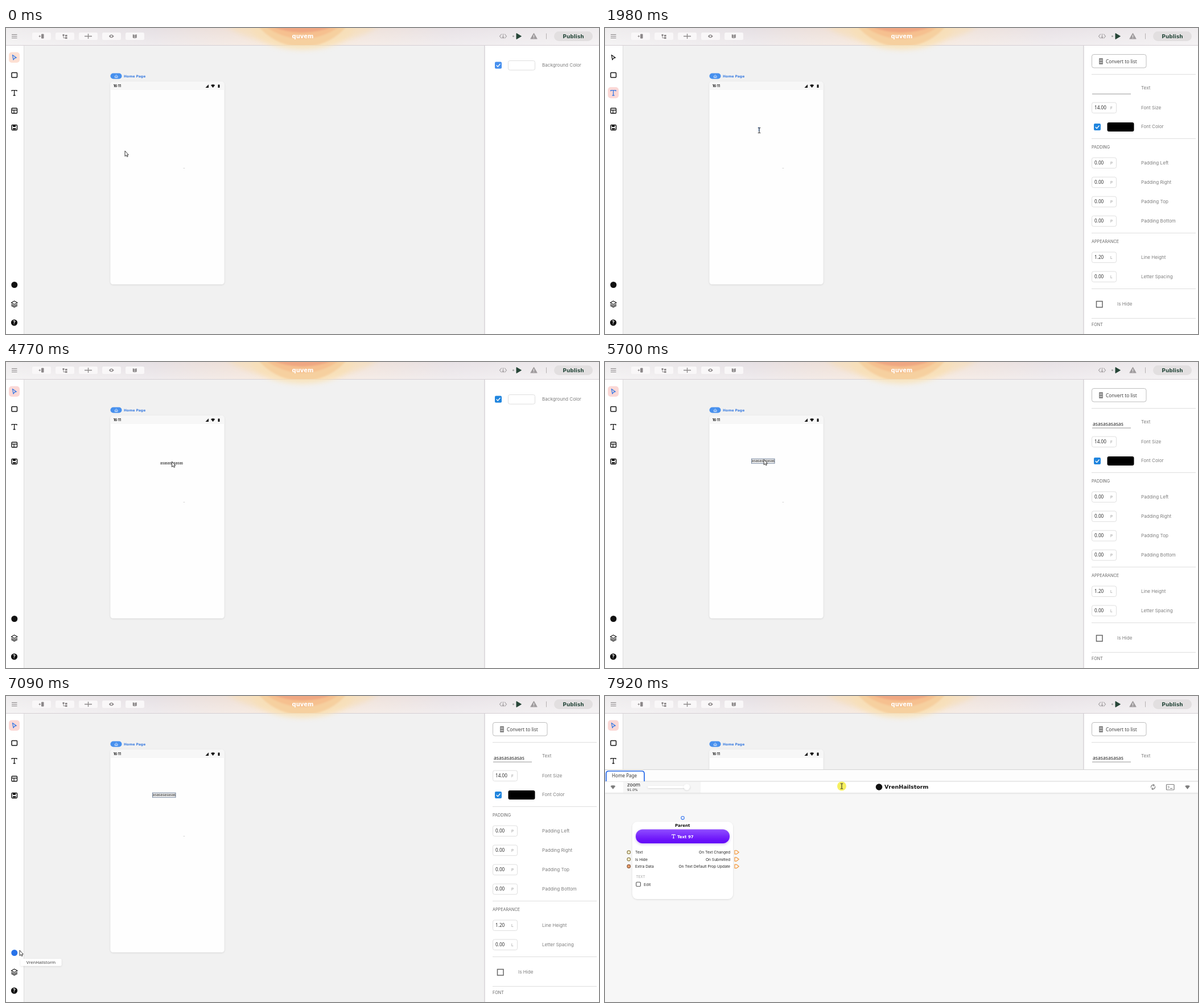
Animation, 1042 px wide and 538 px high, one loop 7990 ms. Source, as an HTML page:

```html
<!DOCTYPE html>
<html lang="en">
<head>
<meta charset="utf-8">
<title>App builder</title>
<style>
html, body { margin: 0; width: 100%; height: 100%; overflow: hidden; background: #f1f1f1; }
svg { display: block; width: 1042px; height: 538px; }
text { white-space: pre; }
.ui { font-family: Inter, sans-serif; }
.wide { font-family: "DejaVu Sans", sans-serif; font-weight: 700; }
.zoom { font-family: "DejaVu Sans", sans-serif; }
.note { font-family: "Noto Sans", sans-serif; }
.app { font-family: Roboto, sans-serif; }
</style>
</head>
<body>
<svg id="stage" viewBox="0 0 1042 538"></svg>
<script>
const LOOP = 7990;
const BRAND = 'quvem', TOOL = 'VrenHailstorm';
const stage = document.getElementById('stage');

// Markup helpers; text is placed by its vertical centre.
const text = (x, y, s, size, fill, cls = 'ui', extra = '') =>
  `<text x="${x}" y="${(y + size * 0.36).toFixed(2)}" font-size="${size}" fill="${fill}" class="${cls}" ${extra}>${s}</text>`;
const rect = (x, y, w, h, fill, extra = '') =>
  `<rect x="${x}" y="${y}" width="${w}" height="${h}" fill="${fill}" ${extra}/>`;
const path = (d, stroke, width = 1, fill = 'none', extra = '') =>
  `<path d="${d}" stroke="${stroke}" stroke-width="${width}" fill="${fill}" ${extra}/>`;
const circle = (x, y, r, fill, extra = '') =>
  `<circle cx="${x}" cy="${y}" r="${r}" fill="${fill}" ${extra}/>`;
const group = (id, body, extra = '') => `<g id="${id}" ${extra}>${body}</g>`;
const END = 'text-anchor="end"', MID = 'text-anchor="middle"';

const defs = `<defs>
  <linearGradient id="bar">
    <stop offset="0" stop-color="#efedee"/><stop offset=".25" stop-color="#e6e0e4"/>
    <stop offset=".4" stop-color="#f0e0d6"/><stop offset=".5" stop-color="#f7e0c4"/>
    <stop offset=".6" stop-color="#f0e2da"/><stop offset=".75" stop-color="#e8e2e6"/>
    <stop offset="1" stop-color="#efecee"/>
  </linearGradient>
  <linearGradient id="fade" x2="0" y2="1">
    <stop offset="0" stop-color="#fff" stop-opacity="0"/><stop offset="1" stop-color="#fff" stop-opacity=".35"/>
  </linearGradient>
  <linearGradient id="violet" x2="0" y2="1">
    <stop offset="0" stop-color="#8f4dff"/><stop offset="1" stop-color="#6000f8"/>
  </linearGradient>
  <filter id="soft" x="-20%" y="-50%" width="140%" height="200%"><feGaussianBlur stdDeviation="5"/></filter>
  <filter id="haze"><feGaussianBlur stdDeviation="1.6"/></filter>
  <filter id="drop" x="-20%" y="-20%" width="140%" height="150%">
    <feDropShadow dx="0" dy="1" stdDeviation="1.8" flood-opacity=".12"/>
  </filter>
  <filter id="glow" x="-10%" y="-30%" width="120%" height="180%">
    <feDropShadow dx="0" dy="1.5" stdDeviation="2" flood-color="#6a30d0" flood-opacity=".35"/>
  </filter>
  <clipPath id="menuClip"><rect x="292" y="176" width="273" height="306"/></clipPath>
  <clipPath id="barClip"><rect width="1042" height="30"/></clipPath>
</defs>`;

function header() {
  const g = '#8c8889';
  let s = rect(0, 0, 1042, 30, 'url(#bar)') + rect(0, 0, 1042, 30, 'url(#fade)')
    + path('M0 30.5H1042', '#d5cfd4')
    + `<ellipse cx="521" cy="-8" rx="92" ry="46" fill="#fbe0ae" opacity=".75" filter="url(#soft)"/>`
    + `<g clip-path="url(#barClip)">`
    + `<ellipse cx="521" cy="-18" rx="138" ry="46" fill="#f7dfba" opacity=".7" filter="url(#soft)"/>`
    + `<g filter="url(#haze)">` + circle(521, -69, 102, '#f7cf9d', 'opacity=".9"')
    + circle(521, -88, 107, '#f6c08f')
    + circle(521, -134, 142, '#f0a782') + `</g></g>`
    + path('M10 11.5H19.5M10 14.5H19.5M10 17.5H19.5', '#858183');
  for (let i = 0; i < 5; i++) s += rect(46 + 41 * i, 8, 33, 13, '#f9f7f8', 'rx="2.5"');
  s += rect(62, 10.5, 4.5, 8, g, 'rx="1"') + path('M57.5 14.5H61M59.3 12.7V16.3', g)
    + rect(99.5, 11, 3, 3, g) + rect(104, 12, 3.5, 3, g) + rect(104, 16, 3.5, 3, g) + path('M101 13.5V17.5H104', g, .9)
    + path('M138 14.5H151M144.5 10V19', g, 1.3)
    + path('M181 14.5Q185 9.2 189.5 14.5Q185 19.5 181 14.5Z', g, .5, g) + circle(185.2, 14.4, 1.4, '#fff')
    + path('M223 11.5L226 12.3L229.5 11.5V17L226 18L223 17Z', g, .5, g) + path('M226.2 12V18', '#fff', .7)
    + text(521.5, 14.5, BRAND, 10, '#fff', 'wide', MID)
    + path('M871 10.5L867.5 14.5L871 18.5M876 10.5L879.5 14.5L876 18.5M873.5 10V18M871.6 15.5L873.5 18L875.4 15.5', '#a29ea0', 1.1)
    + circle(891.5, 14.5, 1.6, '#a9a9a9') + path('M897 9.5L905.5 14.5L897 19.5Z', '#274638', 1, '#274638')
    + path('M927.5 9.5L933 19H922Z', '#a09c9e', 1.2, '#a09c9e', 'stroke-linejoin="round"') + path('M927.5 12.5V16M927.5 17V18', '#fff', 1)
    + path('M949.5 9.5V19.5', '#b5b0b2') + rect(963, 6, 68, 17, '#e2dfe0', 'rx="8.5"')
    + text(997, 14.5, 'Publish', 9, '#294a3d', 'wide', MID);
  return s;
}

function sidebar() {
  const k = '#161616';
  return rect(0, 31, 31, 507, '#fff') + path('M31.5 31V538', '#dcdcdc')
    + `<rect id="mark" x="5" width="19" rx="5"/>`
    + path('M11.5 47.5L18.3 52.2L15 53L13 56Z', k, 1.3, 'none', 'id="pick" stroke-linejoin="round"')
    + rect(10, 78.5, 9.5, 8.5, 'none', `stroke="${k}" stroke-width="1.5" rx="1.2"`)
    + path('M10.2 111.3V109.6H19V111.3M14.6 109.6V118.5M12.6 118.5H16.6', k, 1.3, 'none', 'id="tee"')
    + rect(10, 141, 9.5, 9, 'none', `stroke="${k}" stroke-width="1.4" rx="1.2"`) + path('M10 144.3H19.5M14 144.3V150', k, 1.3)
    + rect(10, 170.5, 9.5, 9, 'none', `stroke="${k}" stroke-width="1.5" rx="1.4"`) + rect(12, 171, 5, 3, k) + rect(12, 176, 5.5, 2.5, k)
    + circle(14.8, 451.5, 5.5, '#111', 'id="bolt"')
    + path('M9.3 483L14.6 480L20 483L14.6 486ZM9.3 485.7L14.6 488.7L20 485.7M9.3 488L14.6 491L20 488', k, 1.2, 'none', 'stroke-linejoin="round"')
    + circle(14.5, 518, 5.6, '#0a0a0a') + text(14.5, 518, '?', 8.5, '#fff', 'ui', MID + ' font-weight="700"');
}

function phone() {
  return rect(183.5, 94.5, 200, 356, '#fefefe', 'rx="4.5" filter="url(#drop)"')
    + path('M183.5 109V99Q183.5 94.5 188 94.5H379Q383.5 94.5 383.5 99V109Z', 'none', 0, '#f7f7f7')
    + rect(183.5, 79.5, 20, 10, '#4790ee', 'rx="5"')
    + path('M191.3 84.8L193.7 82.6L196.1 84.8V87H191.3ZM193.7 85V87', '#fff', .8)
    + text(207, 84.8, 'Home Page', 6, '#3f7fe0', 'wide')
    + text(188.7, 101.8, '16:11', 5.8, '#151515', 'ui', 'font-weight="700"')
    + path('M350.5 105H356V99.3Z', 'none', 0, '#111') + path('M360 100.5Q363.6 97.8 367.2 100.5L363.6 105Z', 'none', 0, '#111')
    + rect(372.5, 99.5, 3, 5.5, '#111', 'rx=".6"') + rect(312, 246, 1.6, .8, '#aaa');
}

const tick = (y) => rect(859, y - 6, 12, 12, '#2085de', 'rx="2" class="tick"')
  + path(`M861.8 ${y}L864.2 ${y + 2.5}L868.5 ${y - 2.5}`, '#fff', 1.3);
const label = (y, s, x = 942) => text(x, y, s, 8.1, '#7f7f7f');
const heading = (y, s) => text(855, y, s, 7.2, '#666');
const field = (y, value, unit, name) =>
  rect(855.5, y - 9, 43, 18.5, '#fff', 'rx="3" stroke="#dfdfdf"')
  + text(860, y, value, 8.2, '#333', 'note') + text(888, y + .5, unit, 6.5, '#909090') + label(y, name);

function inspector() {
  const plain = tick(65.5) + rect(882.5, 57.5, 47, 16.5, '#fff', 'rx="3" stroke="#dedede"') + label(65.5, 'Background Color');
  const rules = [81.5, 194.5, 360.5, 458.5, 510.5].map(y => path(`M855 ${y}H1038`, '#dedede')).join('');
  const sides = ['Left', 'Right', 'Top', 'Bottom'].map((s, i) => field(237 + 34.1 * i, '0.00', 'P', 'Padding ' + s)).join('');
  const props = rules
    + rect(855.5, 46.5, 95.5, 23.5, '#fff', 'rx="3.5" stroke="#bdbdbd"')
    + rect(868, 53, 7, 11, '#8b8b8b', 'rx="1"') + path('M869 56.5H874M869 60.5H874', '#ddd')
    + text(880, 58.5, 'Convert to list', 8.4, '#444', 'note')
    + path('M856 116H924', '#979797') + label(105, 'Text') + text(857, 109, '', 8.65, '#222', 'note', 'id="value"')
    + field(140, '14.00', 'F', 'Font Size')
    + tick(174) + rect(882.5, 166, 47, 16, '#000', 'rx="3"') + label(173.5, 'Font Color')
    + heading(209.5, 'PADDING') + sides
    + heading(375.5, 'APPEARANCE') + field(403, '1.20', 'L', 'Line Height') + field(437, '0.00', 'L', 'Letter Spacing')
    + rect(863.5, 480.5, 10.5, 10.5, '#fff', 'stroke="#666" stroke-width="1.5"') + label(485.5, 'Is Hide', 900)
    + heading(521, 'FONT');
  return rect(841, 31, 201, 507, '#fff') + path('M841 31V538', '#d5d0d5', 1.4)
    + group('plain', plain) + group('props', props);
}

function menu() {
  const dim = '#565656', hot = '#f3b09e', head = '#8d8d8d';
  const line = (y, c = '#303030') => path(`M292 ${y}H565`, c);
  const rows = [['Group', 'g', 1], ['ScrollView', 'h', 1], ['List', 'l', 1], ['PageList', 'p', 1], ['Column', ',', 0], ['Row', '.', 0]];
  const body = rows.map(([name, key, on], i) => {
    const y = 294.5 + 27.25 * i;
    return text(299, y, name, 8.7, on ? hot : dim, 'ui', on ? 'font-weight="500"' : '')
      + text(421, y, 'ctrl+' + key, 7.1, on ? '#999' : dim, 'ui', END)
      + path(`M428.5 ${y - 8}V${y + 9}`, '#5d3a33')
      + text(435, y, 'Un-' + name, 8.6, dim) + text(558, y, 'ctrl+shift+' + key, 7.1, dim, 'ui', END)
      + line((y + 12.5).toFixed(1));
  }).join('');
  return rect(292, 176, 273, 324, '#000', 'rx="8" filter="url(#drop)"')
    + text(299, 193, 'EDIT', 6.5, head)
    + text(299, 215, 'Back to Selection Cursor', 8.7, dim) + text(558, 215, 'v', 7.1, dim, 'ui', END) + line(227.5)
    + text(299, 242.5, 'Edit in ' + TOOL, 8.7, '#ddd', 'ui', 'id="edit"') + text(558, 242.5, 'ctrl+q', 7.1, '#999', 'ui', END)
    + path('M292 254.5H565', '#303030', 1, 'none', 'id="editLine"')
    + text(299, 272, 'CONVERT TO', 6.45, head) + body
    + text(299, 460.5, 'ESSENTIALS', 6.5, head)
    + `<g clip-path="url(#menuClip)">` + text(299, 482.5, 'Delete', 8.7, hot, 'ui', 'font-weight="500"')
    + text(558, 482.5, 'del', 7.1, '#999', 'ui', END) + `</g>`
    + text(428, 489.5, 'ARSENAL', 6.5, '#777', 'ui', MID);
}

function drawer() {
  const g = '#7c7c7c', k = '#252525';
  const ins = ['Text', 'Is Hide', 'Extra Data'], outs = ['On Text Changed', 'On Submitted', 'On Text Default Prop Update'];
  const ports = ins.map((s, i) => {
    const y = 274.7 + 12.4 * i;
    return circle(41.8, y, 2.8, i < 2 ? '#fdf4cf' : '#f0a06c', `stroke="${i < 2 ? '#8c7d4c' : '#8a5a3c'}" stroke-width="1.2"`)
      + text(53, y, s, 6.7, k) + text(220, y, outs[i], 6.7, k, 'ui', END)
      + path(`M228 ${y - 3.2}H231L235.3 ${y}L231 ${y + 3.2}H228Z`, '#f0983f', 1.2, '#fff7ee', 'stroke-linejoin="round"');
  }).join('');
  const arrow = x => path(`M${x - 4} 158.5L${x - 2} 157.5H${x + 2}L${x + 4} 158.5L${x} 163.5Z`, g, .6, g);
  return rect(0, 129, 1042, 409, '#f7f7f7') + rect(0, 150, 1042, 20, '#fff', 'filter="url(#drop)"')
    + rect(0, 129, 1042, 21, '#fdfdfd') + path('M0 129.5H1042M0 150H1042', '#d4d4d4')
    + path('M2 150V136.5Q2 132 6.5 132H64.5Q69 132 69 136.5V150', '#2468e8', 1.7, '#fff')
    + text(12, 140.5, 'Home Page', 8.1, '#383838', 'note')
    + rect(32, 151, 136, 19, '#f6f6f6') + text(39, 156, 'zoom', 8.5, '#222', 'zoom') + text(39, 164.5, '91.0%', 5.8, '#333', 'zoom')
    + rect(75, 158, 74, 4, '#fff', 'rx="2" filter="url(#drop)"') + circle(143.8, 160, 5.3, '#fff', 'filter="url(#drop)"')
    + arrow(14) + arrow(1023.5)
    + circle(481.5, 160, 5.8, '#111') + text(491, 160, TOOL, 9.5, '#111', 'wide')
    + path('M959.7 161.5A3.6 3.6 0 0 1 964.5 156.8M966.3 158.5A3.6 3.6 0 0 1 961.5 163.2M963.5 155L965.3 157L963.2 158.5M962.5 165L960.8 163L963 161.5', g, 1.1)
    + rect(986.5, 155.5, 13.5, 9.5, 'none', `stroke="${g}" stroke-width="1.2" rx="1"`) + path('M989 158L991.5 160.2L989 162.5M993 162.5H997', g)
    + rect(48, 221, 177, 136, '#fff', 'rx="9" filter="url(#drop)"')
    + circle(136.5, 214.3, 2.7, '#fff', 'stroke="#4c84ee" stroke-width="1.3"')
    + text(136.2, 227, 'Parent', 7, '#111', 'wide', MID)
    + rect(54, 234.5, 165, 24.5, 'url(#violet)', 'rx="12" filter="url(#glow)"')
    + path('M117.5 245V243.7H123.3V245M120.4 243.7V249.8M119 249.8H121.8', '#fff') + text(127, 247, 'Text 97', 7, '#fff', 'wide')
    + ports + text(54.5, 318, 'TEXT', 6.3, '#a3a3a3')
    + rect(54.8, 327.2, 7.6, 7.6, '#fff', 'stroke="#555" stroke-width="1.1" rx="1.5"') + text(68, 331, 'Edit', 7, '#333', 'note');
}

const tooltip = rect(25.5, 462, 72, 12.5, '#fff', 'rx="2" filter="url(#drop)"') + text(61.5, 468.5, TOOL, 7.6, '#444', 'note', MID);

const cursors = circle(0, 0, 8, '#f4ec38', 'id="press" opacity=".8"')
  + group('arrow', path('M0 0V9.5L2.2 7.6L3.7 10.5L5.2 9.7L3.8 7H6.3Z', '#222', .9, '#fff'))
  + group('beam', path('M-2.2 -4.5H-.6L0 -4L.6 -4.5H2.2M0 -4V4M-2.2 4.5H-.6L0 4L.6 4.5H2.2', '#222', 1))
  + group('hand', path('M-1.5 -6Q0 -7 .8 -5.5V-2L4.6 -1Q5.6 -.6 5.2 1.2L4.3 5.8H-1.3L-4.2 1.6Q-4 0 -2.3 1L-1.5 1.8Z', '#111', .8, '#fff'));

stage.innerHTML = defs + rect(0, 0, 1042, 538, '#f1f1f1') + phone()
  + group('word', rect(-.5, -4, 40.5, 8, 'none', 'id="frame" stroke="#61748f" stroke-width=".9"')
    + text(0, 0, '', 6.3, '#1c1c1c', 'app', 'id="typed"') + rect(0, -4, 1, 7.5, '#2f80ed', 'id="caret"'))
  + inspector() + sidebar() + group('menu', menu()) + group('tip', tooltip) + group('drawer', drawer())
  + header() + group('cursor', cursors);

const el = {};
stage.querySelectorAll('[id]').forEach(n => el[n.id] = n);
const ticks = stage.querySelectorAll('.tick');
const show = (n, on) => n.setAttribute('display', on ? 'inline' : 'none');
const set = (n, name, v) => n.setAttribute(name, v);

// Pointer route: time, x, y
const route = [
  [0, 209, 216], [690, 18, 116], [850, 18, 116], [1380, 271, 180], [2320, 271, 180],
  [3080, 329, 206], [3340, 339, 217], [3740, 461, 203], [4300, 461, 203], [4770, 291.5, 175],
  [5200, 291.5, 175], [5500, 278.5, 171], [5680, 278.5, 171], [5840, 292, 176], [5880, 292, 176],
  [6120, 315, 244], [6350, 315, 244], [7090, 24, 447], [7260, 24, 447], [7620, 408, 330], [7920, 416, 158.5]
];
const presses = [[690, 830], [1380, 1450], [3740, 3880], [4900, 4970], [5240, 5700], [7230, 7300], [7620, LOOP]];
const GRAB = 7620, SELECT = 4970, COMMIT = 3810;

// Monotone cubic through the route: no stop at passing points, no overshoot at rests.
const slope = (i, n) => (route[i + 1][n] - route[i][n]) / (route[i + 1][0] - route[i][0]);
function tangent(i, n) {
  if (i === 0 || i === route.length - 1) return 0;
  const a = slope(i - 1, n), b = slope(i, n);
  return a * b <= 0 ? 0 : 2 * a * b / (a + b);
}
function pointer(t) {
  const j = route.findIndex(k => k[0] > t);
  if (j < 0) return route[route.length - 1].slice(1);
  const i = j - 1, span = route[j][0] - route[i][0], p = (t - route[i][0]) / span, q = 1 - p;
  return [1, 2].map(n =>
    route[i][n] * q * q * (1 + 2 * p) + route[j][n] * p * p * (3 - 2 * p)
    + span * p * q * (tangent(i, n) * q - tangent(j, n) * p));
}

function typedCount(t) {
  if (t < 2120) return 0;
  if (t < 2320) return 1;
  return Math.min(12, 2 + Math.floor((t - 2320) / 127));
}

function draw(t) {
  const [x, y] = pointer(t);
  const textTool = t >= 760 && t < 4350;
  const props = (t >= 1980 && t < COMMIT) || t >= SELECT;
  const open = t >= 5850 && t < 6460;
  const panel = t >= 7300;
  const editing = t >= 1650 && t < COMMIT;

  set(el.mark, 'y', textTool ? 104 : 42.5);
  set(el.mark, 'height', textTool ? 19.5 : 18.5);
  set(el.mark, 'fill', t < 760 ? '#fde0d3' : '#fbd8d6');
  set(el.pick, 'stroke', textTool ? '#161616' : '#3478e5');
  set(el.tee, 'stroke', textTool ? '#3478e5' : '#161616');
  ticks.forEach(n => set(n, 'fill', t < 1980 ? '#468fee' : '#2085de'));

  show(el.plain, !props);
  show(el.props, props);
  el.value.textContent = t >= SELECT ? 'as'.repeat(6) : '';

  // The word follows the pointer while it is dragged.
  const [dx, dy] = t < 5200 ? [0, 0] : t < 5500 ? [x - 291.5, y - 175] : [-13, -4];
  const n = typedCount(t);
  el.typed.textContent = 'as'.repeat(6).slice(0, n);
  set(el.word, 'transform', `translate(${(editing ? 270 : 271) + dx} ${178.2 + dy})`);
  show(el.frame, t >= SELECT);
  show(el.caret, editing);
  set(el.caret, 'x', n ? el.typed.getComputedTextLength() + .3 : 0);

  show(el.menu, open);
  const hot = y > 228;
  set(el.edit, 'fill', hot ? '#3f86f5' : '#ddd');
  set(el.editLine, 'stroke', hot ? '#24488a' : '#303030');

  const hover = t >= 7000 && !panel;
  set(el.bolt, 'fill', hover ? '#2873ea' : '#111');
  show(el.tip, hover);

  // The drawer opens low and is pulled up by its title bar.
  show(el.drawer, panel);
  set(el.drawer, 'transform', `translate(0 ${(t < GRAB ? 330 : y) - 158.5})`);

  const beam = (textTool && x > 32) || t >= GRAB;
  const hand = open && hot;
  set(el.cursor, 'transform', `translate(${x.toFixed(2)} ${y.toFixed(2)})`);
  show(el.press, presses.some(([a, b]) => t >= a && t < b));
  show(el.beam, beam);
  show(el.hand, hand);
  show(el.arrow, !beam && !hand);
}

const start = performance.now();
function loop() {
  draw((performance.now() - start) % LOOP);
  requestAnimationFrame(loop);
}
draw(0);
requestAnimationFrame(loop);
</script>
</body>
</html>
```
